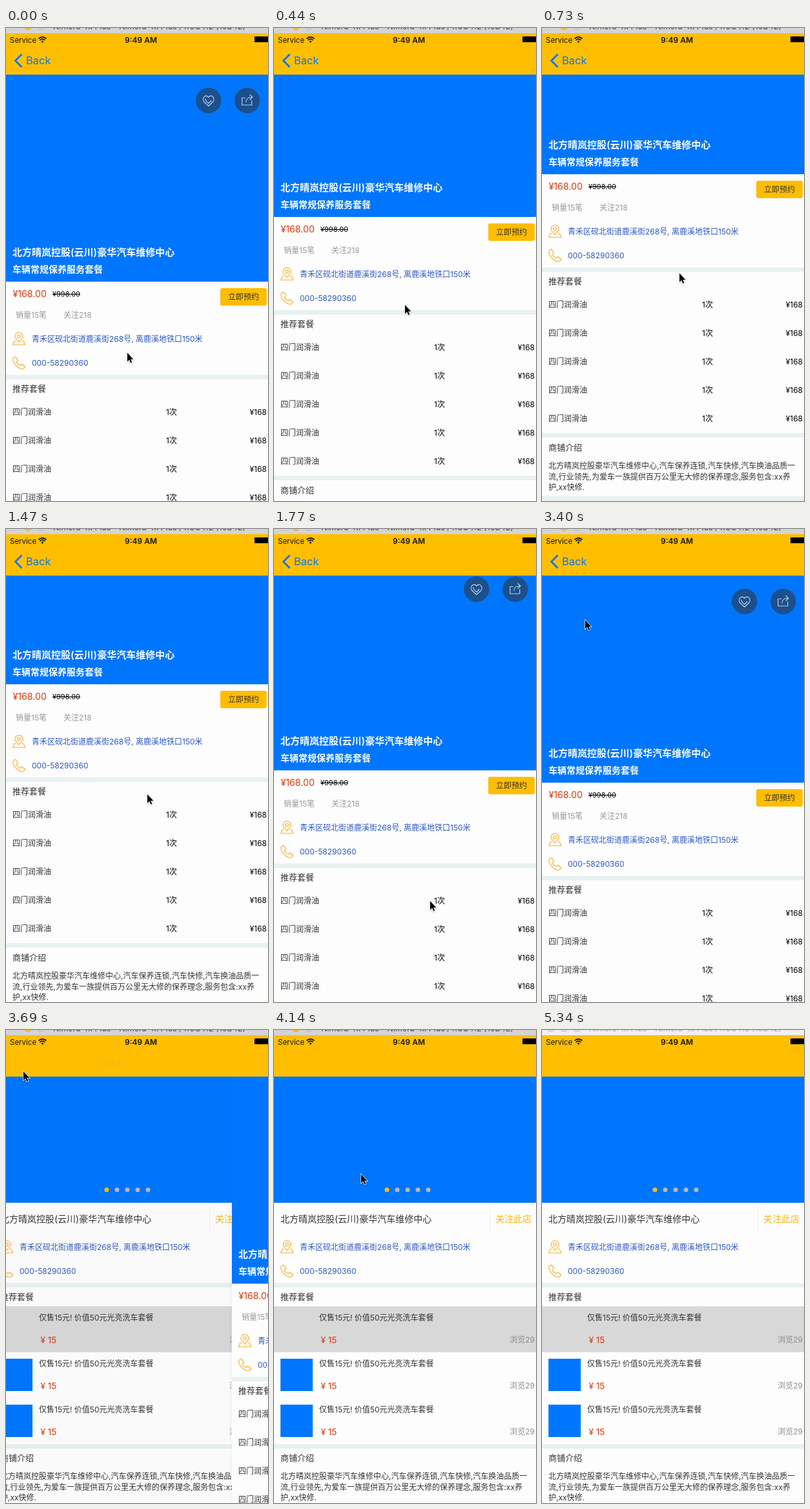
An HTML page that plays this animation: 406x731 px, repeating every 5.41 s.

```html
<!DOCTYPE html>
<html lang="zh">
<head>
<meta charset="utf-8">
<style>
  html, body { margin: 0; height: 100%; overflow: hidden; background: #fff; }
  svg { display: block; width: 100vw; height: 100vh; }
  text { font-family: Inter, "Noto Sans CJK SC", "Noto Sans CJK", sans-serif; white-space: pre; }
</style>
</head>
<body>
<svg id="stage" viewBox="0 0 406 731"></svg>
<script>
const BLUE = '#0076ff', AMBER = '#ffbf00', INK = '#333', LINK = '#2b57c4',
      RED = '#dd3c0c', GRAY = '#999', BAND = '#e8f1f2';

// Text is placed by its vertical centre.
const text = (x, cy, str, size = 12, fill = INK, extra = '') =>
  `<text x="${x}" y="${cy + size * .37}" font-size="${size}" fill="${fill}" ${extra}>${str}</text>`;
const rect = (x, y, w, h, fill, extra = '') =>
  `<rect x="${x}" y="${y}" width="${w}" height="${h}" fill="${fill}" ${extra}/>`;
const circle = (x, y, r, fill, extra = '') =>
  `<circle cx="${x}" cy="${y}" r="${r}" fill="${fill}" ${extra}/>`;
const line = (d, stroke, width, x = 0, y = 0, extra = '') =>
  `<path d="${d}" transform="translate(${x} ${y})" fill="none" stroke="${stroke}"
    stroke-width="${width}" stroke-linejoin="round" ${extra}/>`;
const band = y => rect(0, y, 406, 7, BAND);
const repeat = (n, fn) => Array.from({ length: n }, (_, i) => fn(i)).join('');
const END = 'text-anchor="end"', MIDDLE = 'text-anchor="middle"';

const shop = '北方晴岚控股(云川)豪华汽车维修中心';

const contacts = y =>
  line('M0 5C-3 1-6-1-6-4A6 6 0 0 1 6-4C6-1 3 1 0 5ZM-5 3H-7L-9.5 9H9.5L7 3H5M-2.2-4a2.2 2.2 0 1 0 4.4 0a2.2 2.2 0 1 0-4.4 0',
    '#ffc568', 1.7, 20, y) +
  text(40, y, '青禾区砚北街道鹿溪街268号, 离鹿溪地铁口150米', 12, LINK) +
  line('M-9-7L-5.5-9.5L-1.5-4L-4-1.5C-3 1-1 3 2 4L4.5 2L9.5 6L7 9C0 11-11 0-9-7Z',
    '#ffc568', 1.7, 20, y + 37) +
  text(40, y + 37, '000-58290360', 12, LINK);

const about = y => text(10, y, '商铺介绍', 13) +
  ['北方晴岚控股豪华汽车维修中心,汽车保养连锁,汽车快修,汽车换油品质一',
   '流,行业领先,为爱车一族提供百万公里无大修的保养理念,服务包含:xx养',
   '护,xx快修.'].map((s, i) => text(10, y + 28.5 + i * 16.6, s)).join('') +
  band(y + 75.5);

const roundButton = (x, icon) =>
  circle(x, 112, 19.7, '#333', 'fill-opacity=".56"') + line(icon, '#b9d0ea', 1.2, x, 112);

const detailPage = rect(0, 72, 406, 320, BLUE) +
  roundButton(313.8, 'M0 8.5L-7 2C-11-3-5-11 0-5C5-11 11-3 7 2ZM-5-3C-6 0-2 2 0 4.5L4.5 0') +
  roundButton(373.8, 'M-3-4H-8V7H7V0M-2 3C-2-2 1-5 7-5M4-9L8-5L4-1') +
  text(10, 346, shop, 15, '#fff', 'font-weight="600"') +
  text(10, 373, '车辆常规保养服务套餐', 14, '#fff', 'font-weight="600"') +
  text(10.5, 411, '¥168.00', 14.2, RED) +
  text(72, 411, '¥998.00', 11, '#000', 'text-decoration="line-through"') +
  rect(332, 402, 72, 27, '#ffbd00', 'rx="3"') + text(368, 415.5, '立即预约', 12, INK, MIDDLE) +
  text(15, 444, '销量15笔', 12, GRAY) + text(89, 444, '关注218', 12, GRAY) +
  contacts(480.5) + band(536) + text(10, 557, '推荐套餐', 13) +
  repeat(5, i => {
    const y = 594 + i * 44;
    return text(10, y, '四门润滑油') + text(248, y, '1次', 12, '#000') +
      text(404, y, '¥168', 12, '#000', END);
  }) +
  band(792) + about(814);

const shopPage = rect(0, 72, 406, 659, '#fdfdfd') + rect(0, 72, 406, 195, BLUE) +
  repeat(5, i => circle(175 + i * 16, 247, 3.5, i ? '#b8b8b8' : AMBER)) +
  text(10, 292, shop, 14) + rect(334, 272, 1, 40, BAND) +
  text(343, 292, '关注此店', 14, '#ffb70f') +
  contacts(335.5) + band(391) + text(10, 412, '推荐套餐', 13) +
  repeat(3, i => {
    const y = 427 + i * 71;
    return (i ? rect(10, y + 10, 50, 50, BLUE) : rect(0, y, 406, 71, '#d8d8d8')) +
      text(70, y + 17.5, '仅售15元! 价值50元光亮洗车套餐') +
      text(72.5, y + 52, '¥ 15', 13.5, RED) + text(404, y + 52, '浏览29', 12, '#8e8e8e', END);
  }) +
  band(640) + about(661);

const navBar = rect(0, 7, 406, 65, AMBER) +
  text(6, 18.5, 'Service', 11.5, '#111') +
  line('M50.5 16.5Q56.5 11.5 62.5 16.5M52.5 18.8Q56.5 15.5 60.5 18.8', '#111', 1.7) +
  circle(56.5, 21, 1.5, '#111') +
  text(209, 18.5, '9:49 AM', 12, '#111', MIDDLE + ' font-weight="600"') +
  rect(385, 13, 21, 9, '#000', 'rx="1"') +
  `<g id="back">${line('M24.5 40.5L14.5 50.5L24.5 60.5', BLUE, 2.8, 0, 0, 'id="chevron"')}${text(31, 50, 'Back', 16.5, BLUE)}</g>`;

const titleBar = (id, fill, ink, dots) => `<g id="${id}">` + rect(0, 0, 406, 8, fill) +
  dots.map((c, i) => circle(14 + i * 20, -3, 6, c, 'stroke="#0002" stroke-width=".7"')).join('') +
  `<text x="222" y="2" font-size="12.5" fill="${ink}" ${MIDDLE}>Nimora 4x Plus - Nimora 4x Plus / nOS 7.2 (10B42)</text></g>`;

const $ = id => document.getElementById(id);
$('stage').innerHTML =
  `<g id="rear">${shopPage}${rect(0, 72, 406, 659, '#000', 'id="dim"')}</g>
   <g id="front">${rect(-4, 72, 4, 659, '#000', 'opacity=".015"')}${rect(0, 72, 406, 659, '#fdfdfd')}
     <g id="content">${detailPage}</g></g>
   ${navBar}
   ${titleBar('inactive', '#f0f0f0', '#aaa', ['#dcdcdc', '#dcdcdc', '#dcdcdc'])}
   ${titleBar('active', '#d6d3d6', '#444', ['#dcd8da', '#fdbd2e', '#cfcdcf'])}
   <path id="cursor" d="M0 0V13.6L3.1 10.8L5.3 15.6L7.3 14.7L5.2 10H9.4Z"
     stroke="#fff" stroke-width="1.4" paint-order="stroke"
     style="filter:drop-shadow(0 1px 1px #0004)"/>`;

// Keys are [step, value...], joined by straight lines.
const scrollKeys = [[0, 0], [1, 6], [3, 100], [5, 166], [9, 166], [10, 152], [12, 19], [13, 0]];
const cursorKeys = [[0, 187, 501], [5, 212, 378], [9, 216, 390], [10, 218, 409], [12, 241, 574],
  [13, 250, 582], [16, 267, 523], [17, 265, 524], [18, 265, 524], [24, 26, 63], [25, 26, 63],
  [26, 55, 119], [28, 134, 222], [29, 134, 222], [30, 193, 306]];

function at(keys, n) {
  const i = keys.findIndex(k => k[0] > n);
  if (i < 0) return keys[keys.length - 1].slice(1);
  const [a, b] = [keys[i - 1], keys[i]], f = (n - a[0]) / (b[0] - a[0]);
  return a.slice(1).map((v, j) => v + (b[j + 1] - v) * f);
}

const move = (id, x, y = 0) => $(id).setAttribute('transform', `translate(${x} ${y})`);
const show = (id, on) => $(id).setAttribute('display', on ? 'inline' : 'none');
const fade = (id, a) => $(id).setAttribute('opacity', a);

const LOOP = 5410, STEP = 148.2;

function draw(t) {
  const n = Math.floor((t + 16) / STEP);   // the screen updates in even steps
  const u = Math.max(0, 3.9 * (n - 24.108));
  const left = (1 + u) * Math.exp(-u);     // critically damped page pop
  const done = 1 - left;

  move('content', 0, -Math.round(at(scrollKeys, n)[0]));
  move('front', Math.round(406 * done));
  show('front', left > .001);
  move('rear', -Math.round(406 * left * .34));
  fade('dim', .09 * left);

  move('back', 130 * done);
  fade('back', left > .001 ? left ** 1.4 : 0);
  fade('chevron', Math.max(0, 1 - 2 * done));

  move('cursor', ...at(cursorKeys, n).map(v => Math.round(v) + 1));
  show('cursor', n < 31);
  show('active', t < 5340);
}

const start = performance.now();
(function tick() {
  draw((performance.now() - start) % LOOP);
  requestAnimationFrame(tick);
})();
</script>
</body>
</html>
```
